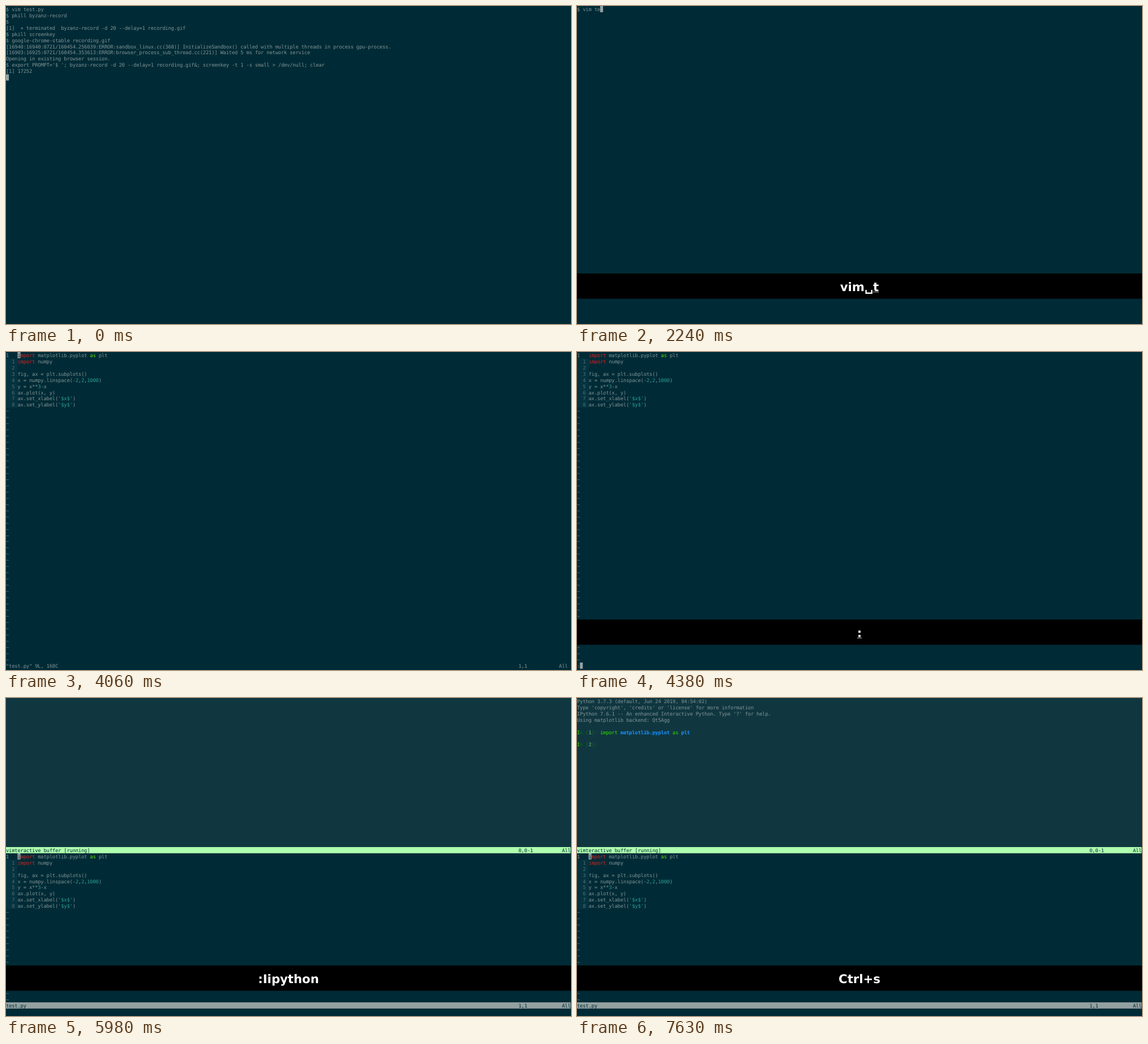
Animation of 998 by 561 pixels, one loop 8000 ms. Source, as an HTML page:

```html
<!DOCTYPE html>
<html lang="en">
<head>
<meta charset="utf-8">
<title>Terminal session</title>
<style>
  html, body { margin: 0; width: 100%; height: 100%; overflow: hidden; background: #002b36; }
  svg { display: block; width: 998px; height: 561px; }
  text { white-space: pre; text-rendering: geometricPrecision; }
  /* 12px glyphs (7.224px advance) set on a 7px grid */
  #term { font: 12px "DejaVu Sans Mono", monospace; letter-spacing: -0.224px; }
  #keys { font: bold 29px "DejaVu Sans", sans-serif; fill: #fff; text-anchor: middle; }
</style>
</head>
<body>
<svg viewBox="0 0 1366 768" preserveAspectRatio="none" xmlns="http://www.w3.org/2000/svg">
  <rect width="1366" height="768" fill="#002b36"/>
  <g id="term"></g>
  <g id="bar">
    <rect y="646" width="1366" height="61" fill="#000"/>
    <text id="keys" x="683" y="688"></text>
    <rect id="line" y="690" height="1" fill="#fff"/>
  </g>
</svg>
<script>
const LOOP = 8000, CW = 7, RH = 15, BASE = 12, COLS = 195;
const LAG = 40, RECENT = 140;
const C = {
  bg: '#002b36', fg: '#839496', gutter: '#053340', number: '#586e75', tilde: '#657b83',
  red: '#e0211f', green: '#5fdf00', cyan: '#2aa198', cursor: '#93a1a1',
  pane: '#103740', running: '#afffaf', prompt: '#0c6a1a', count: '#4f9a5f',
  bright: '#35e000', blue: '#1a93ff'
};

const shellLog = [
  '$ vim test.py',
  '$ pkill byzanz-record',
  '$',
  '[1]  + terminated  byzanz-record -d 20 --delay=1 recording.gif',
  '$ pkill screenkey',
  '$ google-chrome-stable recording.gif',
  '[16940:16940:0721/160454.256039:ERROR:sandbox_linux.cc(368)] InitializeSandbox() called with multiple threads in process gpu-process.',
  '[16903:16925:0721/160454.353613:ERROR:browser_process_sub_thread.cc(221)] Waited 5 ms for network service',
  'Opening in existing browser session.',
  "$ export PROMPT='$ '; byzanz-record -d 20 --delay=1 recording.gif&; screenkey -t 1 -s small > /dev/null; clear",
  '[1] 17252'
];

// Each line is a list of [text, colour] runs
const script = [
  [['import', C.red], [' matplotlib.pyplot '], ['as', C.green], [' plt']],
  [['import', C.red], [' numpy']],
  [],
  [['fig, ax = plt.subplots()']],
  [['x = numpy.linspace(-'], ['2', C.cyan], [','], ['2', C.cyan], [','], ['1000', C.cyan], [')']],
  [['y = x**'], ['3', C.cyan], ['-x']],
  [['ax.plot(x, y)']],
  [['ax.set_xlabel('], ["'$x$'", C.cyan], [')']],
  [['ax.set_ylabel('], ["'$y$'", C.cyan], [')']]
];

const banner = [
  'Python 3.7.3 (default, Jun 24 2019, 04:54:02)',
  "Type 'copyright', 'credits' or 'license' for more information",
  "IPython 7.6.1 -- An enhanced Interactive Python. Type '?' for help."
];

const shell = { text: 'vim test.py', at: [1450, 1600, 1750, 1910, 2100, 2240, 2380, 2510, 2640, 2770, 2900] };
const ex = { text: ':Iipython', at: [4340, 4740, 4940, 5150, 5300, 5440, 5520, 5630, 5750] };
const typed = (cmd, t) => cmd.text.slice(0, cmd.at.filter(a => a <= t).length);

// Key display history: when it changes, what it shows, how many last keys are new
const shown = [];
function logKeys(cmd, enterAt, hideAt) {
  const label = cmd.text.replace(' ', '\u2423');
  cmd.at.forEach((a, i) => shown.push({ at: a + LAG, text: label.slice(0, i + 1), fresh: 1 }));
  shown.push({ at: enterAt, text: label + '\u2009\u23ce', fresh: 1 }, { at: hideAt, text: '' });
}
logKeys(shell, 3130, 4060);
logKeys(ex, 6020, 6940);
shown.push({ at: 7480, text: 'Ctrl+s', fresh: 6 });

const $ = id => document.getElementById(id);
const esc = s => s.replace(/&/g, '&amp;').replace(/</g, '&lt;').replace(/>/g, '&gt;');

const put = (row, col, s, fill = C.fg, weight = 'normal') =>
  `<text x="${col * CW}" y="${row * RH + BASE}" fill="${fill}" font-weight="${weight}">${esc(s)}</text>`;

const block = (row, col, cols, rows, fill) =>
  `<rect x="${col * CW}" y="${row * RH}" width="${cols * CW}" height="${rows * RH}" fill="${fill}"/>`;

const cursor = (row, col) => block(row, col, 1, 1, C.cursor);

function runs(row, col, list) {
  let out = '';
  for (const [s, fill, weight] of list) {
    out += put(row, col, s, fill, weight);
    col += s.length;
  }
  return out;
}

function editor(top, lastRow, active) {
  let out = block(top + 1, 0, 4, script.length - 1, C.gutter);
  script.forEach((line, i) => {
    out += i ? put(top + i, 2, String(i), C.number) : put(top, 0, '1', C.fg);
    out += runs(top + i, 4, line);
  });
  for (let r = top + script.length; r <= lastRow; r++) out += put(r, 0, '~', C.tilde);
  if (active) out += cursor(top, 4) + put(top, 4, 'i', C.bg);
  return out;
}

const status = (row, fill, name, pos) =>
  block(row, 0, COLS, 1, fill) + put(row, 0, name, C.bg) + put(row, 177, pos, C.bg) + put(row, 192, 'All', C.bg);

const prompt = (row, n) => runs(row, 0, [
  ['I', C.bright], ['n [', C.prompt], [n, C.count, 'bold'], [']:', C.prompt]
]);

function python(t) {
  let out = block(0, 0, COLS, 24, C.pane);
  if (t >= 6390) out += banner.map((s, i) => put(i, 0, s)).join('');
  if (t >= 6670) out += put(3, 0, 'Using matplotlib backend: Qt5Agg');
  if (t >= 6710) out += prompt(5, '1');
  if (t >= 7440) out += runs(5, 8, [
    ['import', C.bright], [' '], ['matplotlib.pyplot', C.blue, 'bold'],
    [' '], ['as', C.bright], [' '], ['plt', C.blue, 'bold']
  ]);
  if (t >= 7480) out += prompt(7, '2');
  return out;
}

function terminal(t) {
  if (t < 50) return shellLog.map((s, i) => put(i, 0, s)).join('') + cursor(11, 0);
  if (t < 3220) {
    const line = '$ ' + typed(shell, t);
    return put(0, 0, line) + (t < 3090 ? cursor(0, line.length) : cursor(1, 0));
  }
  if (t < 3260) return cursor(50, 0);
  if (t < 4340) {
    const info = t < 3300 ? '' : put(50, 177, '1,1') + put(50, 191, 'All');
    return editor(0, 49, t >= 3300) + put(50, 0, '"test.py" 9L, 168C') + info;
  }
  if (t < 5980) {
    const line = typed(ex, t);
    return editor(0, 49, false) + put(50, 0, line) + (t < 5940 ? cursor(50, line.length) : '');
  }
  return python(t) + status(24, C.running, 'vimteractive buffer [running]', '0,0-1') +
    editor(25, 48, true) + status(49, C.cursor, 'test.py', '1,1');
}

function drawKeys(t) {
  const now = shown.filter(k => k.at <= t).pop();
  const visible = now && now.text;
  $('bar').style.display = visible ? '' : 'none';
  if (!visible) return;
  const label = $('keys');
  if (label.textContent !== now.text) label.textContent = now.text;
  const fresh = t < now.at + RECENT;
  $('line').style.display = fresh ? '' : 'none';
  if (!fresh) return;
  const n = now.text.length;
  const x = label.getStartPositionOfChar(n - now.fresh).x;
  $('line').setAttribute('x', x);
  $('line').setAttribute('width', label.getEndPositionOfChar(n - 1).x - x);
}

let last = '';
function render(t) {
  const markup = terminal(t);
  if (markup !== last) $('term').innerHTML = last = markup;
  drawKeys(t);
}

const start = performance.now();
function tick() {
  render((performance.now() - start) % LOOP);
  requestAnimationFrame(tick);
}
tick();
</script>
</body>
</html>
```
